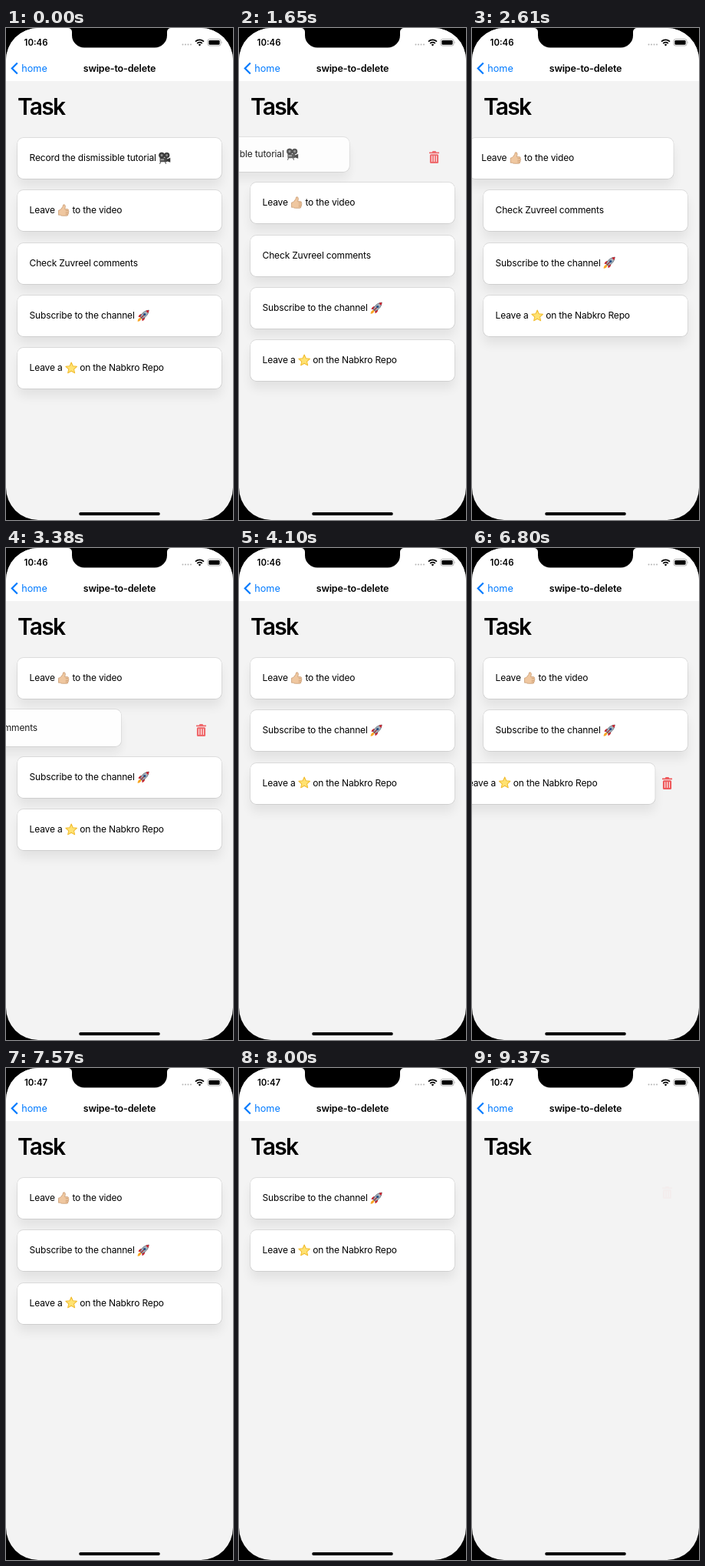
These frames come from a looping animation (296x640 px, 9440 ms). An HTML page:

```html
<!DOCTYPE html>
<html lang="en">
<head>
<meta charset="utf-8">
<title>swipe-to-delete</title>
<style>
  html, body { margin: 0; width: 100%; height: 100%; overflow: hidden; background: #000; }
  body { font-family: Inter, "Liberation Sans", sans-serif; }
  .screen { position: relative; width: 296px; height: 640px; overflow: hidden; border-radius: 42px; background: #f3f3f3; }
  .chrome { position: absolute; inset: 0; }
  .list { position: absolute; top: 135.4px; left: 0; width: 100%; display: flex; flex-direction: column; }
  .item { position: relative; flex: none; }
  .card {
    position: absolute; left: 14.8px; width: 266.4px; height: 100%; border-radius: 7.6px; background: #fff;
    box-shadow: 0 0 0 .7px rgba(0, 0, 0, .12), 0 10px 14px rgba(0, 0, 0, .07);
  }
  .label {
    position: absolute; left: 15.8px; top: calc(50% - .4px); transform: translateY(-50%);
    font-size: 12px; line-height: 20px; letter-spacing: -.17px; white-space: nowrap;
  }
  .label svg { width: 16.3px; height: 16.3px; vertical-align: -4px; }
  .trash { position: absolute; left: 248px; top: 18.6px; }
</style>
</head>
<body>
<div class="screen">
  <div class="list"></div>
  <svg class="chrome" width="296" height="640">
    <rect width="296" height="69" fill="#fff"/>
    <path d="M81 0A5 5 0 0 1 86 5V9.500A16 16 0 0 0 102 25.500H194A16 16 0 0 0 210 9.500V5A5 5 0 0 1 215 0Z"/>
    <text id="clock" x="39" y="23" text-anchor="middle" font-size="11.4" font-weight="600"></text>
    <path d="M230.5 21.6h13" stroke="#b5b5b5" stroke-width="2" stroke-linecap="round" stroke-dasharray="0 3.5"/>
    <g fill="none" stroke="#000" stroke-width="1.7">
      <path d="M247 17.6a8 8 0 0 1 11 0M249.2 20a4.900 4.900 0 0 1 6.600 0"/>
      <path d="M252.5 23.400l-1.700-1.700a2.400 2.400 0 0 1 3.400 0z" fill="#000" stroke="none"/>
    </g>
    <rect x="263" y="14.5" width="17" height="8.6" rx="2.4" fill="none" stroke="#aaa" stroke-width=".9"/>
    <rect x="264.4" y="15.9" width="14.2" height="5.8" rx="1.3"/>
    <path d="M281.2 17.3q1.4 1.5 0 3z" fill="#aaa"/>
    <path d="M14.8 45.5l-7 7 7 7" fill="none" stroke="#007aff" stroke-width="2.2"/>
    <text x="20.2" y="56.8" font-size="12.7" fill="#007aff">home</text>
    <text x="148" y="56.8" text-anchor="middle" font-size="12.5" font-weight="600" letter-spacing="-.15">swipe-to-delete</text>
    <text x="15" y="113.4" font-size="30" font-weight="600" letter-spacing="-1.8">Task</text>
    <rect x="95.2" y="630.1" width="105.6" height="3.8" rx="1.9"/>
  </svg>
</div>
<script>
const LOOP = 9440, WIDTH = 296, HEIGHT = 53.1, MARGIN = 7.6;
const DISMISS = 300, FLICK = 60, FLICK_TO = -110, REST = .59;

const emoji = shapes => `<svg viewBox="0 0 32 32">${shapes}</svg>`;
const starPoints = Array.from({ length: 10 }, (_, i) => {
  const r = i % 2 ? 7 : 15, a = i * Math.PI / 5;
  return [16 + r * Math.sin(a), 17 - r * Math.cos(a)];
}).join(' ');

const camera = emoji(`<path d="M7 21l-4 10M15 21l4 10" stroke="#555" stroke-width="2"/>
  <rect x="3" y="15" width="19" height="11" rx="2" fill="#4a4a4a"/><path d="M21 19l9-4v12l-9-3z" fill="#333"/>
  <g fill="#444" stroke="#222" stroke-width="1.5"><circle cx="8" cy="9" r="7"/><circle cx="21" cy="9" r="6.5"/></g>
  <g fill="#999"><circle cx="8" cy="9" r="2.6"/><circle cx="21" cy="9" r="2.4"/><path d="M5 18h9v4H5z"/></g>`);
const thumb = emoji(`<path d="M3 16q4 0 7-4 5-6 5-10 4-2 5 2 1 4-1 9h7q4 1 2 4 3 2 0 5 2 3-1 4 1 4-3 4H13q-4 0-6-2H3z"
  fill="#efc7a0" stroke="#c08f63" stroke-width="1.3"/>
  <path d="M21 17h7M21 22h7M21 26h6" stroke="#c08f63" stroke-width="1.3"/>`);
const rocket = emoji(`<path d="M9 21q-7 1-8 10 9-1 10-8z" fill="#f9a825"/>
  <path d="M13 12Q6 11 3 19l7 1zM20 19q1 7-7 11l-1-8z" fill="#c8242f"/>
  <path d="M8 20Q13 4 30 2 28 19 12 24z" fill="#a9b4bd" stroke="#5d6a75" stroke-width="1.5"/>
  <path d="M22 4q4-2 8-2 0 5-2 8z" fill="#c8242f"/><circle cx="19" cy="13" r="3.4" fill="#234f86"/>
  <path d="M10 22l7-7" stroke="#9b2730" stroke-width="2.4"/>`);
const star = emoji(`<polygon points="${starPoints}" fill="#ffe272" stroke="#f1bb2c" stroke-width="2" stroke-linejoin="round"/>`);
const trash = `<svg class="trash" width="13" height="16" viewBox="0 0 13 16" fill="#ee5558">
  <path d="M0 1.6h3.7L4.6 0h3.8l.9 1.6H13v1.700H0z"/><rect x=".9" y="4.3" width="11.2" height="11.7" rx="1.5"/>
  <path d="M3.7 6.2v7.7m2.8 0V6.2m2.8 0v7.7" stroke="#fff"/></svg>`;

// peeks: start, length and optional pause of a drag that comes back; gone: start of the dismissal
const tasks = [
  { label: `Record the dismissible tutorial ${camera}`, peeks: [], gone: 1570 },
  { label: `Leave ${thumb} to the video`, peeks: [[2595, 600]], gone: 7695 },
  { label: 'Check Zuvreel comments', peeks: [], gone: 3310 },
  { label: `Subscribe to the channel ${rocket}`, peeks: [[4420, 620], [5106, 600, 240]], gone: 8295 },
  { label: `Leave a ${star} on the Nabkro Repo`, peeks: [[6300, 800], [7100, 470]], gone: 9110 },
];

const list = document.querySelector('.list');
const clock = document.getElementById('clock');
for (const task of tasks) {
  task.item = document.createElement('div');
  task.item.className = 'item';
  task.item.innerHTML = `${trash}<div class="card"><span class="label">${task.label}</span></div>`;
  list.append(task.item);
}

const clamp = (v, max = 1) => Math.min(max, Math.max(0, v));
const easeInOut = u => u < .5 ? 2 * u * u : 1 - 2 * (1 - u) ** 2;

// Out to the left, back, and slightly past the resting place
function peek(t, start, length, pause = 0) {
  const passed = t - start;
  const u = clamp((passed - clamp(passed - REST * length, pause)) / length);
  return -180 * (1 - u) * Math.sin(1.25 * Math.PI * u);
}

function draw(t) {
  clock.textContent = t < 7200 ? '10:46' : '10:47';
  for (const { item, peeks, gone } of tasks) {
    const flick = FLICK_TO * clamp((t - gone + FLICK) / FLICK) ** 2;
    const x = peeks.reduce((sum, p) => sum + peek(t, ...p), flick);
    const p = easeInOut(clamp((t - gone) / DISMISS));
    const [bin, card] = item.children;
    item.style.height = HEIGHT * (1 - p) + 'px';
    item.style.margin = MARGIN * (1 - p) + 'px 0';
    item.style.opacity = 1 - p;
    bin.style.opacity = clamp((-x - 18) / 25);
    card.style.transform = `translateX(${x + (-WIDTH - x) * p}px)`;
  }
}

const start = performance.now();
function frame() {
  draw((performance.now() - start) % LOOP);
  requestAnimationFrame(frame);
}
frame();
</script>
</body>
</html>
```
